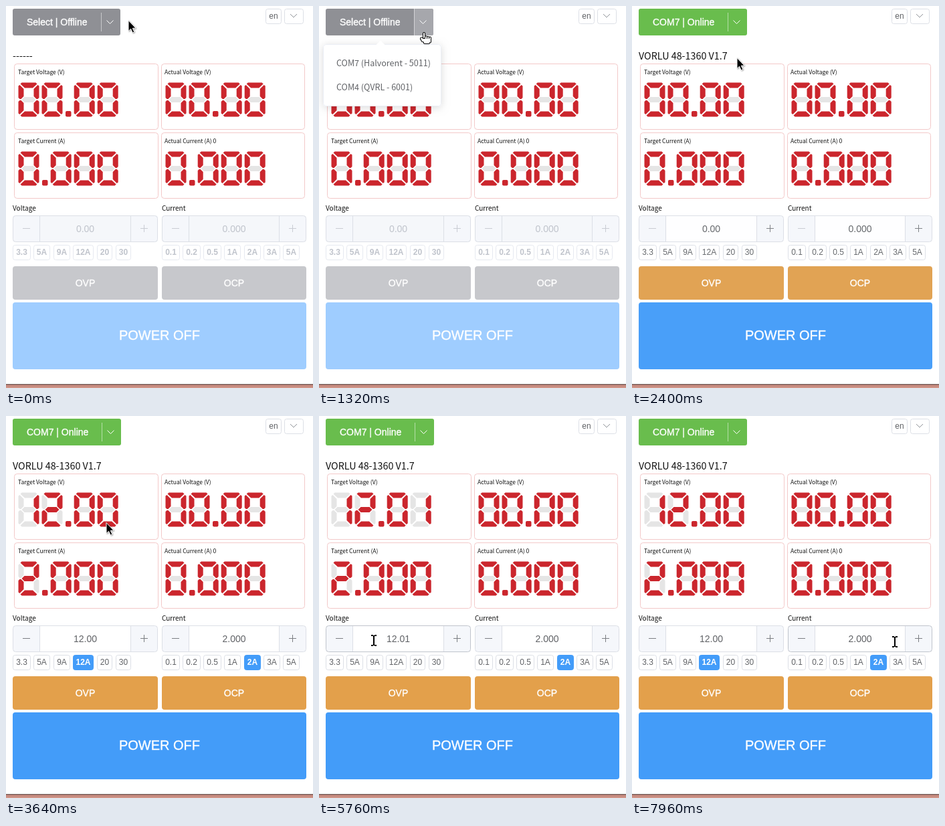
Animation, 459 px wide and 571 px high, one loop 8 s. Source, as an HTML page with a canvas:

```html
<!DOCTYPE html>
<html lang="en">
<head>
<meta charset="utf-8">
<title>Power supply panel</title>
<style>
html, body { margin: 0; width: 459px; height: 571px; overflow: hidden; background: #fff; }
canvas { display: block; }
</style>
</head>
<body>
<canvas id="stage" width="459" height="571"></canvas>
<script>
const g = document.getElementById('stage').getContext('2d');
const LOOP = 8000, TICK = 40;
const ARIAL = '"Liberation Sans", Arial, sans-serif';
const HUM = '"Noto Sans CJK SC", "Noto Sans CJK JP", "Noto Sans CJK", "Noto Sans", sans-serif';
const RED = '#cb262d', OFF = '#e5e5e5', BLUE = '#439cf9', LINE = '#dcdfe6', INK = '#606266', PALE = '#c0c4cc';

// Pointer trips: start and end time, goal, sideways bow
const HOME = { x: 183, y: 22 };
const TRIPS = [
  { from: 20, to: 240, x: 155, y: 24 },
  { from: 400, to: 960, x: 157, y: 36 },
  { from: 1160, to: 1960, x: 157, y: 78 },
  { from: 3240, to: 4040, x: 161, y: 278, bx: -9, by: -18 },
  { from: 4080, to: 4740, x: 206, y: 335 },
  { from: 5320, to: 6120, x: 41, y: 338, bx: -30, by: -2 },
  { from: 6160, to: 6360, x: 35, y: 340 },
  { from: 7160, to: 7960, x: 393, y: 337, by: 36 }
];
const OPEN = 480, PICK = 2120, CONNECT = 2260, LOAD = 2600, STEP_UP = 4760, STEP_DOWN = 6600;

const VOLT = { x: 10, w: 217, cut: 186, chipX: 10, chips: ['3.3', '5A', '9A', '12A', '20', '30'] };
const AMP = { x: 233, w: 216, cut: 408, chipX: 232.5, chips: ['0.1', '0.2', '0.5', '1A', '2A', '3A', '5A'] };

const clamp = v => Math.max(0, Math.min(1, v));
const ramp = (t, a, d) => clamp((t - a) / d);
const inBox = (p, x, y, w, h) => p.x >= x && p.x < x + w && p.y >= y && p.y < y + h;

function mix(a, b, k) {
  const ch = (s, i) => parseInt(s.slice(i, i + 2), 16);
  return 'rgb(' + [1, 3, 5].map(i => Math.round(ch(a, i) + (ch(b, i) - ch(a, i)) * k)).join() + ')';
}

function pointerAt(t) {
  let { x, y } = HOME;
  for (const { from, to, x: gx, y: gy, bx = 0, by = 0 } of TRIPS) {
    const u = ramp(t, from, to - from), e = u * u * (3 - 2 * u), bow = Math.sin(Math.PI * u);
    x += (gx - x) * e + bx * bow;
    y += (gy - y) * e + by * bow;
  }
  return { x: Math.round(x), y: Math.round(y) };
}

function box(x, y, w, h, r, fill, line) {
  g.beginPath();
  if (line) g.roundRect(x + .5, y + .5, w - 1, h - 1, r);
  else g.roundRect(x, y, w, h, r);
  if (fill) { g.fillStyle = fill; g.fill(); }
  if (line) { g.strokeStyle = line; g.lineWidth = 1; g.stroke(); }
}

function rect(x, y, w, h, fill) {
  g.fillStyle = fill;
  g.fillRect(x, y, w, h);
}

function text(s, x, y, size, color, align = 'left', family = ARIAL, weight = '') {
  g.font = `${weight} ${size}px ${family}`;
  g.textAlign = align;
  g.fillStyle = color;
  g.fillText(s, x, y);
}

// White button text, slightly heavier than regular
function caption(s, x, y, size, align = 'center') {
  text(s, x, y, size, '#fff', align);
  g.strokeStyle = '#fff';
  g.lineWidth = .35;
  g.strokeText(s, x, y);
}

function poly(pts, fill, line) {
  g.beginPath();
  for (let i = 0; i < pts.length; i += 2) g.lineTo(pts[i], pts[i + 1]);
  g.closePath();
  g.fillStyle = fill;
  g.fill();
  if (line) { g.strokeStyle = line; g.lineWidth = 1; g.stroke(); }
}

function chevron(x, y, color) {
  g.beginPath();
  g.moveTo(x - 5, y - 2.5);
  g.lineTo(x, y + 2.5);
  g.lineTo(x + 5, y - 2.5);
  g.strokeStyle = color;
  g.lineWidth = 1;
  g.stroke();
}

// Seven segment digits: three shapes, mirrored into place
const W = 31, H = 51, T = 8;
const TOP = [5, 0, W - 5, 0, W - 3, 2, W - T - 1.5, T, T + 1.5, T, 3, 2];
const LEFT = [2, 3.5, T, T + 1.5, T, 20.5, 4, 24.5, 2, 24.5, 0, 22.5, 0, 5];
const MID = [5, H / 2, 9, 21.5, W - 9, 21.5, W - 5, H / 2, W - 9, H - 21.5, 9, H - 21.5];
const flip = (p, fx, fy) => p.map((v, i) => i % 2 ? (fy ? H - v : v) : (fx ? W - v : v));
const SEGS = {
  a: TOP, b: flip(LEFT, 1, 0), c: flip(LEFT, 1, 1), d: flip(TOP, 0, 1),
  e: flip(LEFT, 0, 1), f: LEFT, g: MID
};
const LIT = { 0: 'abcdef', 1: 'bc', 2: 'abged' };

function digit(n, x, y) {
  g.save();
  g.translate(x, y);
  for (const s in SEGS) poly(SEGS[s], LIT[n].includes(s) ? RED : OFF);
  g.restore();
}

function readout(x, y, w, label, value) {
  box(x, y, w, 99, 4, '#fff', '#f3c9c9');
  text(label, x + (x < 100 ? 6 : 5), y + 16, 8.6, '#111', 'left', HUM);
  let cx = x + 6.5;
  for (const c of value) {
    if (c === '.') {
      box(cx + .5, y + 71, 8.5, 8.5, 2, RED);
      cx += 13.2;
    } else {
      digit(c, cx, y + 28.5);
      cx += 35;
    }
  }
}

function stepper({ x, w, cut }, value, on, p) {
  const y = 313, inside = on > .5 && inBox(p, x, y, w, 40);
  const minus = inside && p.x < x + 41, plus = inside && p.x >= cut;
  const edge = minus || plus ? BLUE : inside ? PALE : LINE;
  box(x, y, w, 40, 4, mix('#f5f7fa', '#ffffff', on));
  rect(x + 1, y + 1, 39, 38, '#f5f7fb');
  rect(cut + 1, y + 1, x + w - cut - 2, 38, '#f5f7fb');
  rect(x + 40, y + 1, 1, 38, LINE);
  rect(cut, y + 1, 1, 38, LINE);
  box(x, y, w, 40, 4, null, edge);
  const icon = (cx, live, hot) => rect(cx - 5, y + 19, 11, 1, hot ? BLUE : live ? mix('#c9ccd3', '#7b7e83', on) : '#c9ccd3');
  icon(x + 20, +value > 0, minus);
  icon(cut + 20, true, plus);
  g.fillRect(cut + 20, y + 14, 1, 11);
  text(value, x + w / 2, y + 25, 14, mix(PALE, INK, on), 'center');
}

function chipBoxes({ chipX, chips }) {
  let x = chipX;
  g.font = '12px ' + ARIAL;
  return chips.map(s => {
    const w = g.measureText(s).width + 10, left = Math.round(x);
    x += w + 4.65;
    return { s, x: left, w: Math.round(w) };
  });
}

function chipRow(group, active, on) {
  for (const { s, x, w } of chipBoxes(group)) {
    const lit = s === active;
    box(x, 357, w, 23, 3, lit ? BLUE : '#fff', lit ? BLUE : mix('#e6e9f0', LINE, on));
    text(s, x + w / 2, 372, 12, lit ? '#fff' : mix(PALE, INK, on), 'center', ARIAL, lit || on < .5 ? 'bold' : '');
  }
}

function portButton(online, p) {
  const x = online ? 143 : 142, w = online ? 162 : 161;
  const hover = inBox(p, x, 4, 29, 40);
  box(10, 4, w, 40, 3, online ? '#69bd4d' : '#8f9095');
  if (hover) box(x, 4, 29, 40, [0, 3, 3, 0], online ? '#85ce61' : '#a6a7ac');
  rect(x, hover ? 4 : 10, 1, hover ? 40 : 28, 'rgba(255,255,255,.5)');
  caption(online ? 'COM7 | Online' : 'Select | Offline', 31, 29, 14, 'left');
  chevron(x + 13.5, 24, '#fff');
}

function menu(k, p) {
  if (k <= 0) return;
  g.save();
  g.globalAlpha = k;
  g.translate(0, 52);
  g.scale(1, k);
  g.translate(0, -52);
  g.shadowColor = 'rgba(0,0,0,.14)';
  g.shadowBlur = 12;
  g.shadowOffsetY = 2;
  box(6, 57, 177, 93, 4, '#fff');
  g.shadowColor = 'transparent';
  box(6, 57, 177, 93, 4, null, '#ebeef5');
  poly([85.5, 58, 92, 51.5, 98.5, 58], '#fff');
  ['COM7 (Halvorent - 5011)', 'COM4 (QVRL - 6001)'].forEach((s, i) => {
    const y = 67 + i * 36, hot = inBox(p, 6, y, 177, 36);
    if (hot) rect(7, y, 175, 36, '#ecf5ff');
    text(s, 26, y + 23, 12.54, hot ? '#66b1ff' : INK, 'left', HUM);
  });
  g.restore();
}

function pointerKind(p, menuOpen) {
  if (menuOpen && inBox(p, 6, 67, 177, 72)) return 'hand';
  if (inBox(p, 10, 4, 161, 40)) return 'hand';
  for (const group of [VOLT, AMP]) {
    const { x, w, cut } = group;
    if (inBox(p, x, 313, w, 40)) return p.x > x + 40 && p.x < cut ? 'beam' : 'hand';
    if (chipBoxes(group).some(c => inBox(p, c.x, 357, c.w, 23))) return 'hand';
  }
  return 'arrow';
}

// Each shape is drawn grown by one pixel for its outline, then filled
const SHAPES = {
  beam(e, fill) {
    const part = (x, y, w, h) => rect(x - e, y - e, w + 2 * e, h + 2 * e, fill);
    part(-1, -7, 2, 15);
    for (const y of [-8, 7]) for (const x of [-4, 1]) part(x, y, 3, 2);
  },
  hand(e, fill) {
    const part = (x, y, w, h) => box(x - e, y - e, w + 2 * e, h + 2 * e, 1 + e, fill);
    for (let i = 0; i < 4; i++) part(-1 + 3 * i, i ? 4.5 + i * .7 : 0, 2, 8);
    part(-1, 9, 10, 5);
    part(0, 12, 8, 4);
    part(-5, 7.5, 3, 3);
    part(-3.5, 9, 4, 4);
  }
};

function pointer(p, kind) {
  g.save();
  g.translate(p.x, p.y);
  if (kind === 'arrow') {
    g.shadowColor = 'rgba(0,0,0,.3)';
    g.shadowBlur = 2;
    g.shadowOffsetX = g.shadowOffsetY = 1;
    poly([0, -.5, 0, 15.5, 3.6, 12.2, 6.2, 18, 8.8, 16.8, 6.3, 11.3, 11, 11], '#000', '#fff');
  } else {
    const dark = kind === 'beam';
    SHAPES[kind](1, dark ? '#fff' : '#000');
    SHAPES[kind](0, dark ? '#000' : '#fff');
  }
  g.restore();
}

function draw(t) {
  const p = pointerAt(t);
  const on = ramp(t, CONNECT, 150), online = t >= CONNECT, set = t >= LOAD;
  const bumped = t >= STEP_UP && t < STEP_DOWN;
  const volts = !set ? '0.00' : bumped ? '12.01' : '12.00';
  const amps = set ? '2.000' : '0.000';
  const opening = t < PICK ? ramp(t, OPEN, 280) : 1 - ramp(t, PICK, 200);

  rect(0, 0, 459, 571, '#fff');
  portButton(online, p);
  box(388, 4, 24, 23, 3, '#fff', LINE);
  text('en', 400, 19, 12, INK, 'center');
  box(416, 4, 29, 23, 3, '#fff', LINE);
  chevron(430, 14.5, '#909399');
  text(online ? 'VORLU 48-1360 V1.7' : '------', 10, 80, 14.33, '#111', 'left', HUM, 350);

  readout(12, 86, 216, 'Target Voltage (V)', volts.padStart(5, '0'));
  readout(232, 86, 215, 'Actual Voltage (V)', '00.00');
  readout(12, 189, 216, 'Target Current (A)', amps);
  readout(232, 189, 215, 'Actual Current (A) 0', '0.000');

  text('Voltage', VOLT.x, 306, 10.03, '#111', 'left', HUM);
  text('Current', AMP.x, 306, 10.03, '#111', 'left', HUM);
  stepper(VOLT, volts, on, p);
  stepper(AMP, amps, on, p);
  chipRow(VOLT, set && !bumped ? '12A' : '', on);
  chipRow(AMP, set ? '2A' : '', on);

  const amber = mix('#c7c8cc', '#e3a04b', on);
  for (const [{ x, w }, name] of [[VOLT, 'OVP'], [AMP, 'OCP']]) {
    box(x, 389, w, 50, 4, amber);
    caption(name, x + w / 2, 419, 14);
  }
  box(10, 443, 439, 100, 4, mix('#9fcdff', BLUE, on));
  caption('POWER OFF', 229.5, 498.5, 20);

  rect(0, 565, 459, 1, '#64524f');
  const strip = g.createLinearGradient(0, 566, 0, 571);
  strip.addColorStop(0, '#b87f75');
  strip.addColorStop(1, '#d6998c');
  rect(0, 566, 459, 5, strip);

  menu(opening, p);
  pointer(p, pointerKind(p, opening > 0));
}

function frame(now) {
  const t = now % LOOP;
  draw(t - t % TICK);
  requestAnimationFrame(frame);
}
draw(0);
requestAnimationFrame(frame);
</script>
</body>
</html>
```
